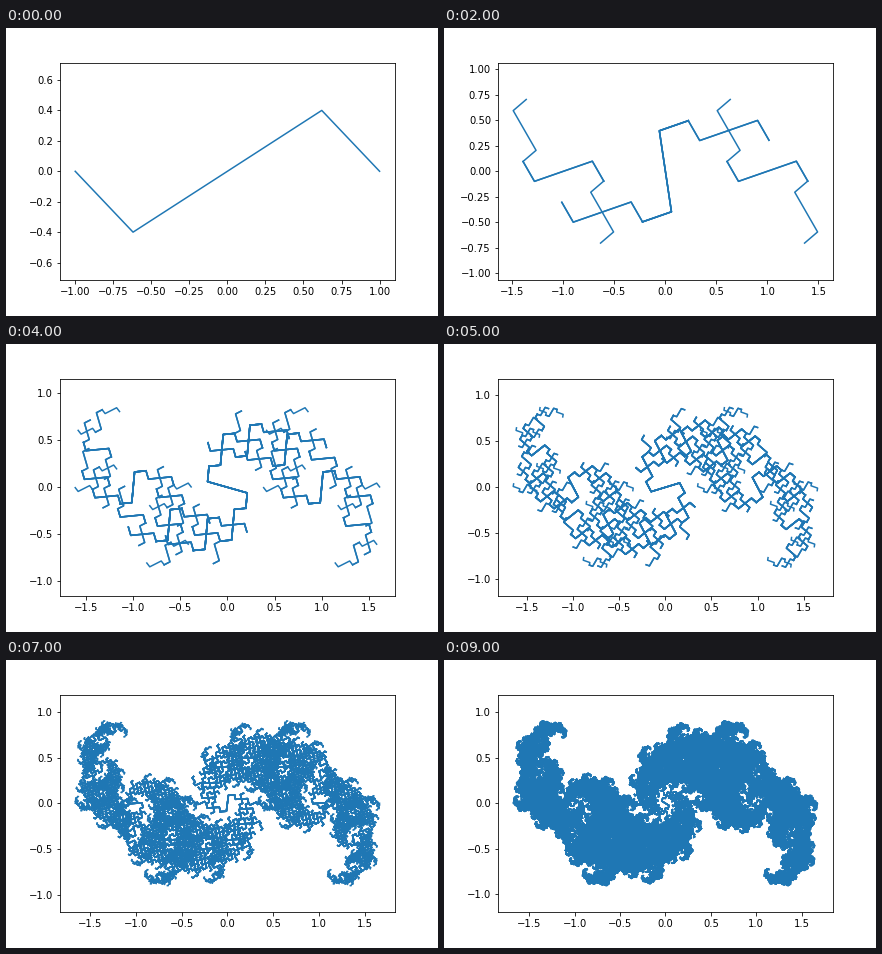
Animation, 432 px wide and 288 px high, one loop 10 s. Source, as a matplotlib script:

```python
import numpy as np
import matplotlib.pyplot as plt
from matplotlib.animation import FuncAnimation
from matplotlib.collections import LineCollection

LEVELS = 10
A = 0.62 + 0.4j
B = 1 - A
MOTIF = np.array([-1, -A, A, 1])
MAX_LAYERS = 8

plt.rcParams["font.family"] = "DejaVu Sans"
fig = plt.figure(figsize=(6, 4), dpi=72, facecolor="white")
fig.subplots_adjust(left=0.125, right=0.9, bottom=0.125, top=0.88)
ax = fig.add_subplot()
box = ax.get_position()
ASPECT = box.height * 4 / (box.width * 6)

curve = LineCollection([], colors="#1f77b4", linewidths=1.5,
                       capstyle="projecting", joinstyle="round")
ax.add_collection(curve, autolim=False)


def copies(level):
    """Centre, scale and layer count of every motif after `level` steps."""
    centre = np.array([0j])
    scale = np.array([1 + 0j])
    layers = np.array([1])
    for _ in range(level):
        centre = np.concatenate([B * centre - 1, A * centre, B * centre + 1])
        scale = np.concatenate([B * scale, A * scale, B * scale])
        # the middle map is applied twice, as +A and -A
        layers = np.concatenate([layers, 2 * layers, layers])
    return centre, scale, np.minimum(layers, MAX_LAYERS)


def draw(level):
    centre, scale, layers = copies(level)
    points = centre[:, None] + scale[:, None] * MOTIF
    half = 1.1 * np.abs(points.real).max()
    points = np.repeat(points, layers, axis=0)
    curve.set_segments(np.stack([points.real, points.imag], axis=-1))
    ax.set_xlim(-half, half)
    ax.set_ylim(-half * ASPECT, half * ASPECT)
    return (curve,)


def reset():
    return draw(0)


anim = FuncAnimation(fig, draw, frames=LEVELS, init_func=reset,
                     interval=1000, repeat=True, repeat_delay=0, blit=False)
plt.show()
```
